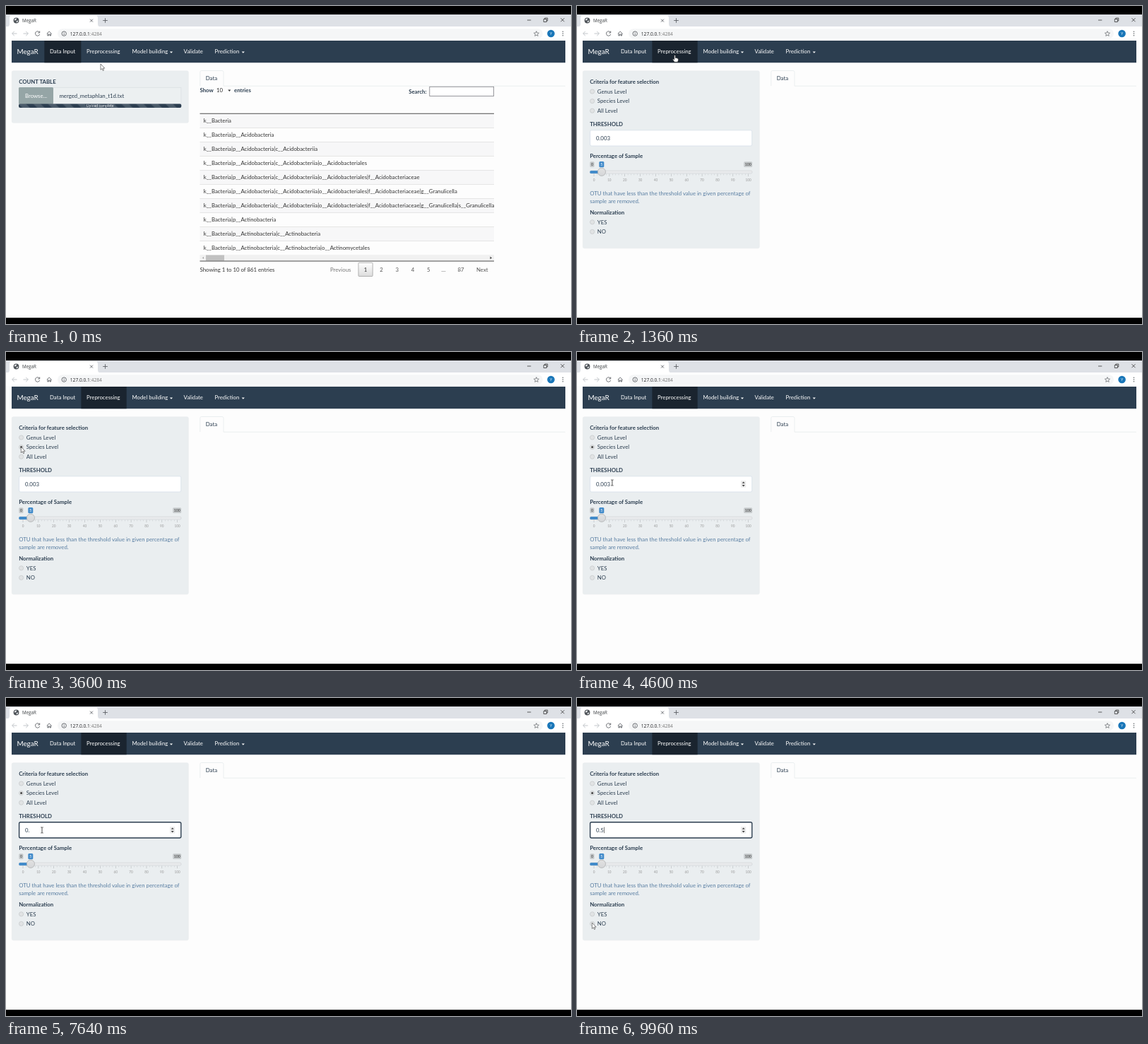
These frames come from a looping animation (800x450 px, 10000 ms). An HTML page:

```html
<!DOCTYPE html>
<html lang="en">
<head>
<meta charset="utf-8">
<title>MegaR</title>
<style>
html, body { margin: 0; width: 100%; height: 100%; overflow: hidden; background: #000; }
svg { display: block; width: 800px; height: 450px; }
text { font: 7.81px Lato, sans-serif; fill: #2c3e50; white-space: pre; }
.b { font-weight: 700; }
.w { fill: #fff; }
.brand { font-size: 9.9px; fill: #fff; }
.ui { font: 6.2px "Open Sans", "Noto Sans", sans-serif; fill: #3c4043; }
.url { font-size: 6.65px; fill: #202124; }
.row { fill: #333; }
.help { fill: #597ea2; }
.tiny { font-size: 5.2px; }
.grid { font-size: 4.7px; fill: #999; }
.mid { text-anchor: middle; }
.end { text-anchor: end; }
.page { fill: #555; }
.line { fill: none; stroke: #5f6368; stroke-width: .9; }
</style>
</head>
<body>
<svg id="stage" viewBox="0 0 800 450" xmlns="http://www.w3.org/2000/svg"></svg>
<script>
const text = (x, y, s, cls = '', extra = '') => `<text x="${x}" y="${y}" class="${cls}" ${extra}>${s}</text>`;
const rect = (x, y, w, h, fill, extra = '') => `<rect x="${x}" y="${y}" width="${w}" height="${h}" fill="${fill}" ${extra}/>`;
const path = (d, extra = 'class="line"') => `<path d="${d}" ${extra}/>`;
const group = (id, body, extra = '') => `<g id="${id}" ${extra}>${body}</g>`;

const defs = `<defs>
  <pattern id="stripes" patternUnits="userSpaceOnUse" x="18" y="138.6" width="20.8" height="20.8">
    <path d="M0 0H10.4L20.8 10.4V20.8ZM0 10.4L10.4 20.8H0Z" fill="#fff" fill-opacity=".15"/></pattern>
  <linearGradient id="button" x2="0" y2="1"><stop stop-color="#fff"/><stop offset="1" stop-color="#dcdcdc"/></linearGradient>
  <linearGradient id="knob" x2="0" y2="1"><stop stop-color="#e2e2e2"/><stop offset="1" stop-color="#d4d6d8"/></linearGradient>
  <clipPath id="tableClip"><rect x="274" y="150" width="417" height="205"/></clipPath>
</defs>`;

function browser() {
  return rect(0, 12, 800, 429.5, '#fdfdfd') +
    rect(0, 12, 800, 17.5, '#dee1e6') +
    rect(0, 29, 800, 19, '#fff') +
    path('M1 29.5Q5 29.5 5 25.5V17Q5 13 9 13H126Q130 13 130 17V25.5Q130 29.5 134 29.5Z', 'fill="#fff"') +
    '<circle cx="14.5" cy="20.5" r="3.9" fill="#50555a"/>' +
    path('M11.7 19.2Q13 17.2 15 17.7L14.5 19.4L12.8 20.7ZM14.6 21.2L17.2 20.5Q17.2 22.6 15.2 23.5Z', 'fill="#e8eaed"') +
    text(23, 22.7, 'MegaR', 'ui') +
    path('M119 18.6L123 22.6M123 18.6L119 22.6M137.2 20.5H143.8M140.5 17.2V23.8') +
    path('M738 20H743.3M761.3 18.5H765.3V22.5H761.3ZM762.8 18.5V17H766.8V21H765.3M785.5 17.2L790.5 22.2M790.5 17.2L785.5 22.2', 'fill="none" stroke="#222" stroke-width=".7"') +
    path('M15.5 39H8.7M11.8 35.8L8.6 39L11.8 42.2M24.5 39H31.3M28.2 35.8L31.4 39L28.2 42.2', 'fill="none" stroke="#bcc0c4" stroke-width=".9"') +
    path('M47.3 37.2A3.2 3.2 0 1 0 47.7 40M47.7 35.5V38H45.2M57.9 39.2L61.2 36L64.5 39.2M58.9 38.6V42H60.3V40H62.1V42H63.5V38.6') +
    rect(73, 32.3, 687, 13.6, '#f5f6f7', 'rx="6.8"') +
    '<circle cx="82.2" cy="39.1" r="3.2" class="line"/>' +
    path('M82.2 38.6V41M82.2 37.1V37.8') +
    text(90.8, 41.6, '127.0.0.1<tspan fill="#777">:4284</tspan>', 'ui url') +
    path('M751 35.6L752 38L754.6 38.2L752.6 39.9L753.2 42.4L751 41.1L748.8 42.4L749.4 39.9L747.4 38.2L750 38Z', 'fill="none" stroke="#5f6368" stroke-width=".7"') +
    '<circle cx="771.6" cy="39" r="5.3" fill="#1976b8"/>' +
    text(771.6, 41, 'Y', 'ui mid', 'style="fill:#fff;font-size:5.2px"') +
    [36.2, 39, 41.8].map(y => `<circle cx="788.5" cy="${y}" r=".8" fill="#5f6368"/>`).join('');
}

function navbar() {
  const caret = x => path(`M${x} 64.5h4.2l-2.1 2.2Z`, 'fill="#fff"');
  return rect(8, 49, 784, 31.2, '#2c3e50') +
    rect(54.3, 49, 52, 31.2, '#1a242f', 'id="tab"') +
    text(15.4, 67.9, 'MegaR', 'brand') +
    text(62, 67.3, 'Data Input', 'w') +
    text(114, 67.3, 'Preprocessing', '', 'id="prep"') +
    text(178.4, 67.3, 'Model building', 'w') + caret(231.9) +
    text(251.5, 67.3, 'Validate', 'w') +
    text(295.4, 67.3, 'Prediction', 'w') + caret(333.7);
}

const well = h => rect(8.3, 91.8, 250, h, '#eaeef0', 'rx="2" stroke="#e4e9eb" stroke-width=".5"');

const dataTab = path('M274.8 113.2V93.5Q274.8 91.5 276.8 91.5H306Q308 91.5 308 93.5V113.2H792', 'fill="none" stroke="#e6ebec" stroke-width=".8"') +
  text(282.8, 105.4, 'Data');

function table() {
  const bac = 'k__Bacteria', aci = bac + '|p__Acidobacteria', cls = aci + '|c__Acidobacteriia',
    ord = cls + '|o__Acidobacteriales', fam = ord + '|f__Acidobacteriaceae', gen = fam + '|g__Granulicella',
    act = bac + '|p__Actinobacteria', actC = act + '|c__Actinobacteria';
  const rows = [bac, aci, cls, ord, fam, gen, gen + '|s__Granulicella_unclassified', act, actC, actC + '|o__Actinomycetales'];
  const body = rows.map((s, i) => {
    const y = 152.5 + i * 20;
    return (i % 2 ? '' : rect(274.5, y, 416.5, 20, '#f7f7f8')) +
      (i ? rect(274.5, y - .3, 416.5, .6, '#d8d8d8') : '') +
      text(279.8, y + 12.6, s, 'row');
  }).join('');
  const pages = [['2', 531.4], ['3', 553.7], ['4', 575.9], ['5', 598.2], ['…', 619.5], ['87', 644]];
  return text(274.5, 122.4, 'Show', 'b') +
    text(298, 122.4, '10', 'row') + path('M314.3 118.6h4l-2 2.3Z', 'fill="#333"') +
    text(323, 122.4, 'entries', 'b') +
    text(595.5, 123.8, 'Search:', 'b end') +
    rect(599.8, 114.3, 90.8, 13.1, '#fff', 'stroke="#8a8a90" stroke-width=".9"') +
    `<g clip-path="url(#tableClip)">${body}</g>` +
    rect(274.5, 151.8, 416.5, .8, '#222') +
    rect(274.5, 352.2, 416.5, 8.6, '#f1f1f1') +
    rect(283, 352.5, 26, 8, '#c1c1c1') +
    path('M280 354.8V358L278 356.4Z', 'fill="#a3a3a3"') +
    path('M685.5 354.6V358.2L688 356.4Z', 'fill="#444"') +
    rect(274.5, 360.6, 416.5, .8, '#222') +
    text(274.5, 375.6, 'Showing 1 to 10 of 861 entries', 'row') +
    text(459, 376, 'Previous', '', 'style="fill:#777"') +
    rect(499, 363.3, 20.2, 19.2, 'url(#button)', 'rx="1" stroke="#979797" stroke-width=".7"') +
    text(509.1, 376, '1', 'mid row') +
    pages.map(([s, x]) => text(x, 376, s, 'mid page')).join('') +
    text(666, 376, 'Next', 'page');
}

function inputPage() {
  return well(73.5) + text(18.2, 110, 'COUNT TABLE', 'b') +
    rect(18.3, 115.3, 229.6, 23.2, '#ecf0f1', 'stroke="#dce1e5" stroke-width=".9"') +
    rect(18, 115, 49, 24, '#95a5a6', 'rx="1.5"') +
    text(27, 130, 'Browse...', 'w') + text(75.4, 130, 'merged_metaphlan_t1d.txt') +
    rect(18, 138.6, 230.3, 5.4, '#2c3e50', 'rx="2"') + rect(18, 138.6, 230.3, 5.4, 'url(#stripes)', 'rx="2"') +
    text(133.2, 143.3, 'Upload complete', 'tiny w mid') + table();
}

const radio = (y, label) => `<circle cx="21.6" cy="${y}" r="3.1" fill="#e1e3e4" stroke="#c0c3c5" stroke-width=".6"/>` +
  text(28.8, y + 2.8, label);

function slider() {
  let s = rect(18.3, 233, 229.8, 4.1, '#e8eaec', 'rx="2" stroke="#c8ccce" stroke-width=".5"') +
    rect(18.3, 233, 16.5, 4.1, '#428bca', 'rx="1.5"');
  for (let i = 0; i <= 50; i++) {
    const major = i % 5 === 0, x = 24 + i * 4.374;
    s += rect(x - .25, 237.5, .5, major ? 3.6 : 1.9, major ? '#a9adb0' : '#c3c7c9');
    if (major) s += text(x, 248, i * 2, 'grid mid');
  }
  return s + rect(18.3, 220.2, 6.2, 7.8, '#c6cacc', 'rx="1.5"') + text(21.4, 226, '0', 'tiny mid row') +
    rect(236.2, 220.2, 12, 7.8, '#c6cacc', 'rx="1.5"') + text(242.2, 226, '100', 'tiny mid row') +
    rect(31.3, 219.9, 7, 8.4, '#428bca', 'rx="1.5"') + text(34.8, 226, '5', 'tiny mid w') +
    '<circle cx="34.9" cy="234.8" r="5.6" fill="url(#knob)" stroke="#a9abad" stroke-width=".7"/>';
}

function prepPage() {
  return well(251) + text(18.2, 110, 'Criteria for feature selection', 'b') +
    radio(121, 'Genus Level') + radio(134.6, 'Species Level') + radio(148.2, 'All Level') +
    '<circle id="dot" cx="21.6" cy="134.6" r="1.5" fill="#444"/>' +
    text(18.2, 170, 'THRESHOLD', 'b') +
    rect(18.6, 175.8, 229.2, 22.2, '#fff', 'id="box" rx="2"') +
    text(27, 189.7, '', '', 'id="value"') +
    rect(0, 182.6, .6, 8.6, '#222', 'id="caret"') +
    group('spin', rect(232, 182.2, 7.2, 9.4, '#ececec') + path('M233.7 185.8h4l-2-2.4ZM233.7 188.1h4l-2 2.4Z', 'fill="#444"')) +
    text(18.2, 214.8, 'Percentage of Sample', 'b') + slider() +
    text(18.2, 267.5, 'OTU that have less than the threshold value in given percentage of', 'help') +
    text(18.2, 278.6, 'sample are removed.', 'help') +
    text(18.2, 294.8, 'Normalization', 'b') + radio(305.8, 'YES') + radio(319.4, 'NO');
}

const pointer = group('arrow', path('M0 0V8.4L1.9 6.6L3.2 9.5L4.5 8.9L3.2 6.1H5.8Z', 'fill="#fff" stroke="#333" stroke-width=".6"')) +
  group('hand', path('M-.8 .7Q0 -.5 .8 .7V3.9Q1.8 3.3 2.3 4.3Q3.3 3.8 3.7 4.7Q4.8 4.4 4.9 5.5V7.5L4 9.8H-.6L-2.9 6.3Q-2.8 5.2 -1.8 5.6L-.8 6.4Z', 'fill="#fff" stroke="#222" stroke-width=".6"')) +
  group('beam', path('M-1.7 -4H-.4L0 -3.6L.4 -4H1.7M0 -3.6V3.6M-1.7 4H-.4L0 3.6L.4 4H1.7', 'fill="none" stroke="#222" stroke-width=".8"'));

const $ = id => document.getElementById(id);
$('stage').innerHTML = defs + browser() + navbar() + dataTab +
  group('pageA', inputPage()) + group('pageB', prepPage()) + group('mouse', pointer) +
  rect(0, 0, 800, 12, '#000') + rect(0, 441.3, 800, 9, '#000');

// time, x, y
const track = [
  [0, 134, 82], [440, 134, 82], [880, 138.5, 69.5], [2040, 138.5, 69.5], [2280, 146, 111],
  [2480, 136, 127], [3040, 21.3, 134.2], [4000, 21.3, 134.2], [4680, 51, 187],
  [9080, 51, 187], [9880, 21.3, 318], [10000, 21.3, 318]
];
const entry = [[0, '0.003'], [6320, '0.00'], [6640, '0.0'], [6960, '0.'], [8560, '0.5']];
const SWITCH = 1360, PICK = 3600, FOCUS = 4920, LOOP = 10000;

function mouseAt(t) {
  const i = track.findIndex((p, k) => k && t <= p[0]);
  const [t0, x0, y0] = track[i - 1], [t1, x1, y1] = track[i];
  const u = (t - t0) / (t1 - t0), e = u * u * (3 - 2 * u);
  return [x0 + (x1 - x0) * e, y0 + (y1 - y0) * e];
}

const show = (id, on) => $(id).setAttribute('display', on ? 'inline' : 'none');

function draw(t) {
  const [x, y] = mouseAt(t);
  const second = t >= SWITCH, focus = t >= FOCUS;
  const onLink = y < 80, onBox = second && x > 18 && x < 249 && y > 175 && y < 199;
  show('pageA', !second);
  show('pageB', second);
  $('tab').setAttribute('x', second ? 106.4 : 54.3);
  $('tab').setAttribute('width', second ? 64.3 : 52);
  $('prep').style.fill = !second && onLink ? '#18bc9c' : '#fff';

  show('dot', t >= PICK);
  show('spin', focus || onBox);
  $('box').setAttribute('stroke', focus ? '#2c3e50' : '#dce4ec');
  $('box').setAttribute('stroke-width', focus ? 1.4 : 1);

  const [since, value] = entry.filter(e => e[0] <= t).pop();
  $('value').textContent = value;
  const blink = (t - Math.max(since, FOCUS)) % 1000 < 500;
  show('caret', focus && blink);
  if (focus) $('caret').setAttribute('x', 27.2 + $('value').getComputedTextLength());

  $('mouse').setAttribute('transform', `translate(${x} ${y})`);
  show('hand', onLink);
  show('beam', onBox);
  show('arrow', !onLink && !onBox);
}

const start = performance.now();
function tick() {
  const t = (performance.now() - start) % LOOP;
  draw(Math.floor(t / 40) * 40);
  requestAnimationFrame(tick);
}
tick();
</script>
</body>
</html>
```
